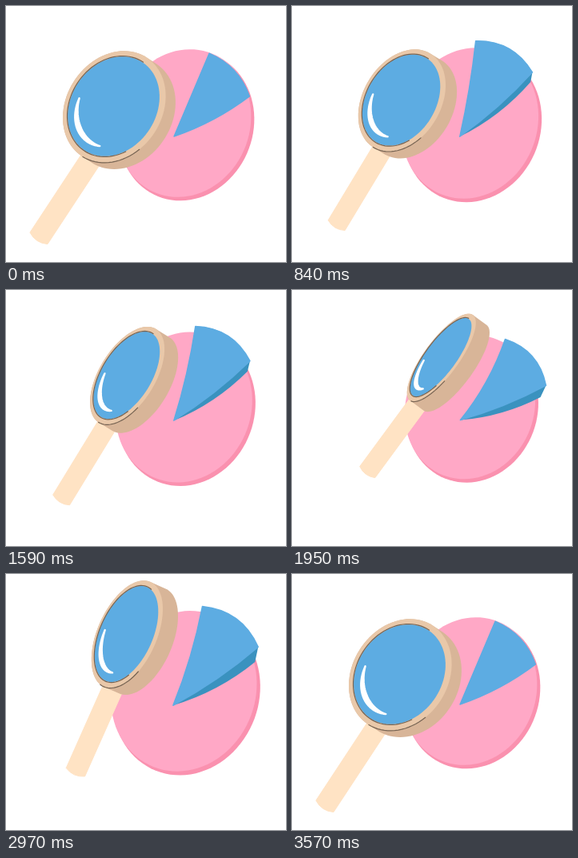
These frames come from a looping animation (350x320 px, 3.6 s). An HTML page:

```html
<!DOCTYPE html>
<html lang="en">
<head>
<meta charset="utf-8">
<title>Magnifier and pie chart</title>
<style>
html, body { margin: 0; width: 100%; height: 100%; overflow: hidden; background: #fff; }
svg { display: block; width: 350px; height: 320px; }
</style>
</head>
<body>
<svg viewBox="0 0 350 320">
  <path id="pieSide" fill="#fa91af"/>
  <path id="pieTop" fill="#ffa8c6"/>
  <path id="wedgeSide" fill="#3a92bf"/>
  <path id="wedgeTop" fill="#5dace2" stroke="#5dace2" stroke-width="1.4" stroke-linejoin="round"/>
  <path id="handle" fill="#ffe3c4" stroke="#ffe3c4" stroke-linejoin="round"/>
  <path id="body" fill="#d8b598"/>
  <path id="ring" fill="#e9c8a9"/>
  <path id="glass" fill="#5dace2"/>
  <g fill="none" stroke="#776453" stroke-width="1.2" stroke-linecap="round">
    <path id="innerLine"/>
    <path id="outerLine"/>
  </g>
  <path id="shine" fill="#fff" stroke="#fff" stroke-width="2.4" stroke-linejoin="round"/>
</svg>
<script>
const LOOP = 3600, STEP = 30, REST = 3570, OPENING = 450;

// Key poses: time, lens x, lens y, lens turn (deg), sway, wedge spin (deg).
// Sway drives zoom and tilt together; every other measure follows from these.
const poses = [
  [0, 134.5, 125.5, 36, .28, 23],
  [450, 145, 131, 34, .26, 17],
  [780, 138, 122, 43, .4, 11],
  [1110, 131.5, 93.5, 54.5, .72, 2.5],
  [1620, 153, 106, 60, .4, 14],
  [1950, 186, 84, 71, .05, 29],
  [2430, 180.5, 84.5, 69, .2, 24.5],
  [2830, 141, 77, 59, .95, 17],
  [2970, 150.5, 75, 59, 1, 16.5],
  [3240, 160, 79, 54, .45, 19]
];
poses.push([REST, ...poses[0].slice(1)]);

const rate = (i, j) => (poses[i + 1][j] - poses[i][j]) / (poses[i + 1][0] - poses[i][0]);

function slope(i, j) {
  if (i === 0 || i === poses.length - 1) return 0;
  const before = poses[i][0] - poses[i - 1][0], after = poses[i + 1][0] - poses[i][0];
  return (rate(i - 1, j) * after + rate(i, j) * before) / (before + after);
}

// Smooth curve through the key poses.
function poseAt(t) {
  let i = 0;
  while (i < poses.length - 2 && t >= poses[i + 1][0]) i++;
  const a = poses[i], b = poses[i + 1], d = b[0] - a[0], u = Math.min(1, (t - a[0]) / d);
  return [1, 2, 3, 4, 5].map(j =>
    a[j] + (b[j] - a[j]) * u * u * (3 - 2 * u)
      + d * u * (1 - u) * ((1 - u) * slope(i, j) - u * slope(i + 1, j)));
}

const ease = u => {
  u = Math.max(0, Math.min(1, u));
  return u * u * (3 - 2 * u);
};
const rad = deg => deg * Math.PI / 180;
const put = (id, d) => document.getElementById(id).setAttribute('d', d);
const xy = p => p[0].toFixed(2) + ' ' + p[1].toFixed(2);
const line = pts => 'M' + pts.map(xy).join('L');
const shape = pts => line(pts) + 'Z';

// Point on a tilted disc that is squashed across its tilt.
function disc(x, y, size, tilt, squash) {
  const nx = Math.cos(rad(tilt)), ny = Math.sin(rad(tilt));
  return (deg, r = 1) => {
    const px = size * r * Math.cos(rad(deg)), py = size * r * Math.sin(rad(deg));
    const cut = (1 - squash) * (px * nx + py * ny);
    return [x + px - cut * nx, y + py - cut * ny];
  };
}

function arc(at, from, to, r = () => 1) {
  const n = Math.ceil(Math.abs(to - from) / 4);
  return Array.from({ length: n + 1 }, (_, i) => at(from + (to - from) * i / n, r(i / n)));
}

// Control point that bows the chord p-q sideways by k of its length.
const bow = (p, q, k) => [
  (p[0] + q[0]) / 2 + (q[1] - p[1]) * k,
  (p[1] + q[1]) / 2 - (q[0] - p[0]) * k
];

function drawPie(zoom, sway, spin, open) {
  const at = (dx, dy) => [224 + dx * zoom, 148 + dy * zoom];
  put('pieSide', shape(arc(disc(...at(1.5, 2), 95 * zoom, 22, .876), 0, 360)));
  put('pieTop', shape(arc(disc(...at(-1.6, -1.5), 94 * zoom, 22, .876), 0, 360)));

  const tip = at(-14, 15);
  const ray = (deg, len) => [
    tip[0] + len * zoom * Math.sin(rad(deg)),
    tip[1] - len * zoom * Math.cos(rad(deg))
  ];
  const l = ray(spin, 113 + 6 * open), r = ray(spin + 39, 107 + 12 * open);
  const low = [r[0] - .24 * spin * open, r[1] + (5.5 + .3 * spin + 8.5 * sway) * open];
  const rim = bow(l, r, .22 + .07 * open);
  const edge = bow(r, tip, .08 - .025 * open);
  const base = bow(low, tip, .08 + .02 * open);
  const left = bow(tip, l, -.003 * spin * open);
  put('wedgeTop', `M${xy(l)}Q${xy(rim)} ${xy(r)}Q${xy(edge)} ${xy(tip)}Q${xy(left)} ${xy(l)}Z`);
  put('wedgeSide', `M${xy(r)}L${xy(low)}Q${xy(base)} ${xy(tip)}Q${xy(edge)} ${xy(r)}Z`);
}

function drawLens(x, y, turn, sway, open) {
  const size = 64.5 + 5 * sway - 5.5 * open, tilt = 37 - 13 * sway;
  const nx = Math.cos(rad(tilt)), ny = Math.sin(rad(tilt));
  const squash = Math.cos(rad(turn)), depth = .38 * size * Math.sin(rad(turn));

  // across and down are measured in lens sizes along the tilted axes
  const place = (across, down) => [
    x + size * (across * nx - down * ny),
    y + size * (across * ny + down * nx)
  ];
  const mid = .19, half = .2;
  put('handle', `M${xy(place(mid - half, .9))}L${xy(place(mid - half, 2.87))}`
    + `Q${xy(place(mid, 2.98))} ${xy(place(mid + half, 2.87))}L${xy(place(mid + half, .9))}Z`);

  const glass = disc(x, y, size, tilt, squash);
  const ring = disc(x + nx, y + ny, size * 1.12, tilt, squash);
  const back = disc(x + nx * (1 + depth), y + ny * (1 + depth), size * 1.12, tilt, squash);
  put('body', shape([...arc(ring, tilt + 90, tilt + 270), ...arc(back, tilt - 90, tilt + 90)]));
  put('ring', shape(arc(ring, 0, 360)));
  put('glass', shape(arc(glass, 0, 360)));
  put('innerLine', line(arc(glass, 69, 304, () => 1.01)));
  put('outerLine', line(arc(ring, 55, 122)));

  const swell = u => .04 * Math.sin(Math.PI * u);
  put('shine', shape([
    ...arc(glass, 106, 197, u => .81 + swell(u)),
    ...arc(glass, 197, 106, u => .81 - swell(u))
  ]));
}

function draw(now) {
  const t = Math.floor((now % LOOP) / STEP) * STEP;
  const [x, y, turn, sway, spin] = poseAt(t);
  const open = ease(t / OPENING) * ease((REST - t) / OPENING);
  drawPie(.965 + .12 * sway, sway, spin, open);
  drawLens(x, y, turn, sway, open);
}

let start;
function tick(now) {
  start ??= now;
  draw(now - start);
  requestAnimationFrame(tick);
}
draw(0);
requestAnimationFrame(tick);
</script>
</body>
</html>
```
